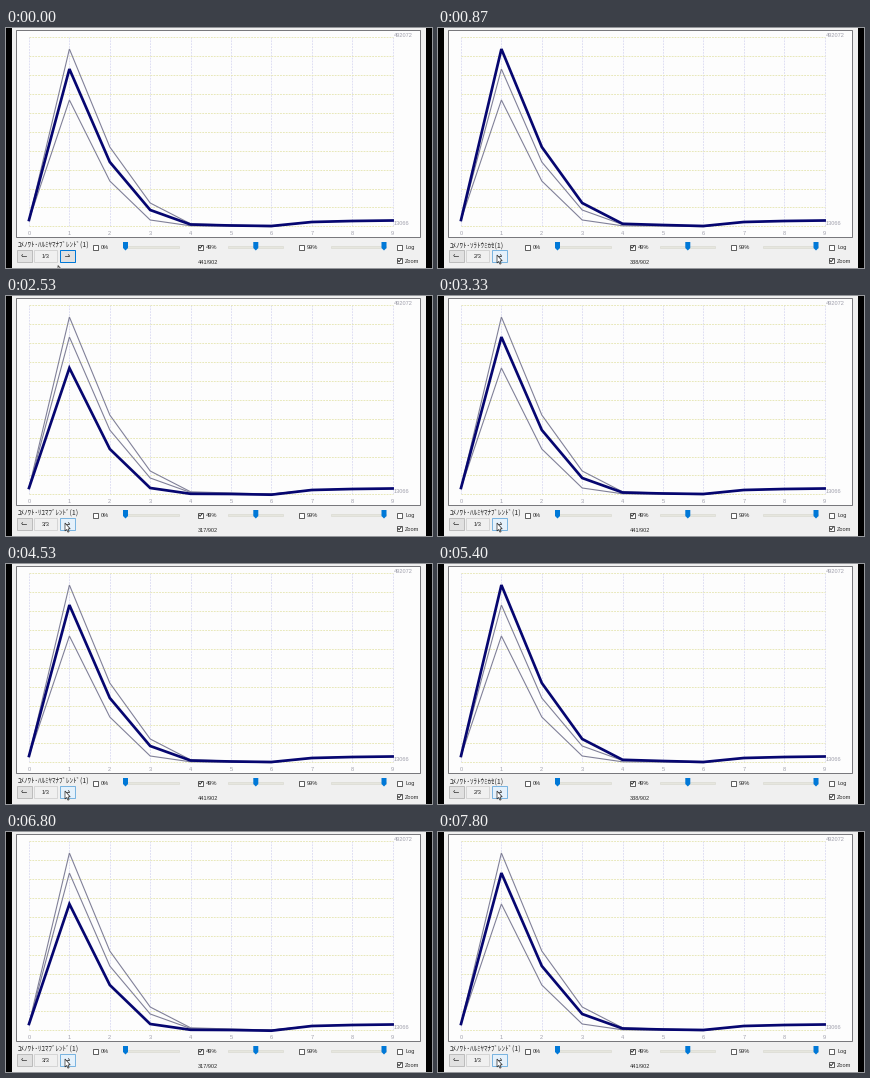
A matplotlib script that plays this animation: 426x240 px, repeating every 7.87 s.

```python
import matplotlib.pyplot as plt
from matplotlib.animation import FuncAnimation
from matplotlib.patches import Polygon, Rectangle

W, H, DPI = 426, 240, 100
LOOP, FRAMES = 7870, 118
PT = 72 / DPI
FIRST_CLICK, CLICK_GAP = 550, 1350

NAVY, THIN, BLUE = "#060670", "#808098", "#0078d7"
PANEL, INK, AXIS = "#f0f0f0", "#282828", "#a0a0ac"
UI, JP = "Liberation Sans", "Noto Sans CJK JP"

ITEMS = [
    ("ﾕﾒﾉﾜﾄ･ﾊﾙﾐﾔﾏﾅﾌﾞﾚﾝﾄﾞ(1)", "441/902",
     [192, 41, 134, 182, 196.5, 197.5, 198, 194, 193, 192.5]),
    ("ﾕﾒﾉﾜﾄ･ｿﾗﾄｳﾐｶｾ(1)", "338/902",
     [192, 21, 119, 175, 195.8, 197, 198, 194, 193, 192.5]),
    ("ﾕﾒﾉﾜﾄ･ﾘﾕﾏﾌﾞﾚﾝﾄﾞ(1)", "317/902",
     [192, 72, 153, 192, 197.8, 198, 198.7, 194, 193, 192.5]),
]
XS = [23 + 40.4 * i for i in range(10)]

fig = plt.figure(figsize=(W / DPI, H / DPI), dpi=DPI, facecolor="black")
ax = fig.add_axes([0, 0, 1, 1])
ax.set_xlim(0, W)
ax.set_ylim(H, 0)
ax.axis("off")


def rect(x, y, w, h, face, edge="none", lw=1, z=1):
    box = Rectangle((x, y), w, h, fc=face, ec=edge, lw=lw * PT, zorder=z)
    return ax.add_patch(box)


def line(xs, ys, color, lw=1, z=2, **kw):
    return ax.plot(xs, ys, color=color, lw=lw * PT, zorder=z, **kw)[0]


def text(x, y, s, size=5.7, color=INK, ha="left", font=UI):
    return ax.text(x, y, s, fontsize=size * PT, color=color, ha=ha,
                   va="center_baseline", family=font, zorder=6)


def checkbox(x, y, label, checked=False):
    rect(x, y, 5, 5, "white", "#505050", 0.9, 3)
    if checked:
        line([x + 1, x + 2.1, x + 4.2], [y + 2.5, y + 3.8, y + 1.1], INK, 0.9, 4)
    text(x + 8, y + 2.8, label)


def slider(x, thumb):
    rect(x, 217.5, 55, 2, "#e6e6de", "#d8d8d0", 0.6, 2)
    shape = [(-2.5, 214), (2.5, 214), (2.5, 220), (0, 222.5), (-2.5, 220)]
    ax.add_patch(Polygon([(thumb + dx, y) for dx, y in shape],
                         fc=BLUE, ec="none", zorder=4))


def arrow(x, direction):
    tip = x + 2.4 * direction
    line([x - 2.4, x + 2.4], [227.5, 227.5], "#404040", 0.8, 5)
    line([tip - direction, tip, tip - direction],
         [226.5, 227.5, 228.5], "#404040", 0.7, 5)


# Window and plot area
rect(6, 0, 414, H, PANEL)
rect(9.5, 2, 404.5, 207, "#fdfdfd", "#78787c", 1)

for i, x in enumerate(XS):
    line([x, x], [9, 198.5], "#dcdcf2", 0.9, dashes=(2, 1.2))
    text(x, 205.3, str(i), 5.7, AXIS, "center")
for i in range(11):
    y = 9.3 + 18.9 * i
    line([23, 387], [y, y], "#e6e6b4", 0.9, dashes=(2, 1.2))
text(388, 6.8, "492072", 5.7, AXIS)
text(388, 194.8, "13066", 5.7, AXIS)

curves = [line(XS, ys, THIN, solid_joinstyle="miter") for _, _, ys in ITEMS]

# Controls
rect(10.5, 222, 15, 11.5, "#e1e1e1", "#b8b8b8", 0.9, 3)
rect(28, 222, 23, 11.5, PANEL, "#d2d2d2", 0.9, 3)
next_button = rect(54, 222, 14.5, 11.5, "#e1e1e1", BLUE, 1, 3)
arrow(18, -1)
arrow(61, 1)

checkbox(87, 216.5, "0%")
checkbox(192, 216.5, "49%", True)
checkbox(293, 216.5, "99%")
checkbox(391, 216.5, "Log")
checkbox(391, 230, "Zoom", True)
slider(118, 119.5)
slider(222, 249.8)
slider(325, 378)

name = text(12, 216.3, "", 7, font=JP)
page = text(39.5, 228, "", ha="center")
count = text(202, 234.3, "", 5.5, ha="center")

POINTER = [(0, 0), (0, 8), (1.7, 6.5), (3, 9.2), (4.1, 8.6),
           (3, 6), (5.2, 5.8)]
cursor = ax.add_patch(Polygon(POINTER, fc="white", ec=INK, lw=0.7 * PT, zorder=9))


def move_cursor(t):
    p = min(max((t - 70) / 380, 0), 1)
    p = p * p * (3 - 2 * p)
    x, y = 52 + 7 * p, 237.5 - 10.5 * p
    cursor.set_xy([(x + dx, y + dy) for dx, dy in POINTER])
    return y


def update(frame):
    t = frame * LOOP / FRAMES
    clicks = int((t - FIRST_CLICK) // CLICK_GAP) + 1 if t >= FIRST_CLICK else 0
    current = clicks % len(ITEMS)
    for i, curve in enumerate(curves):
        active = i == current
        curve.set(color=NAVY if active else THIN,
                  linewidth=(2.7 if active else 1.1) * PT,
                  zorder=5 if active else 4)
    label, total, _ = ITEMS[current]
    name.set_text(label)
    count.set_text(total)
    page.set_text(f"{current + 1}/{len(ITEMS)}")
    hover = move_cursor(t) < 233
    next_button.set(facecolor="#e5f1fb" if hover else "#e1e1e1",
                    edgecolor="#7ab4e0" if hover else BLUE)
    return [*curves, name, count, page, next_button, cursor]


anim = FuncAnimation(fig, update, frames=FRAMES, interval=LOOP / FRAMES,
                     repeat=True, repeat_delay=0, blit=False)
plt.show()
```
